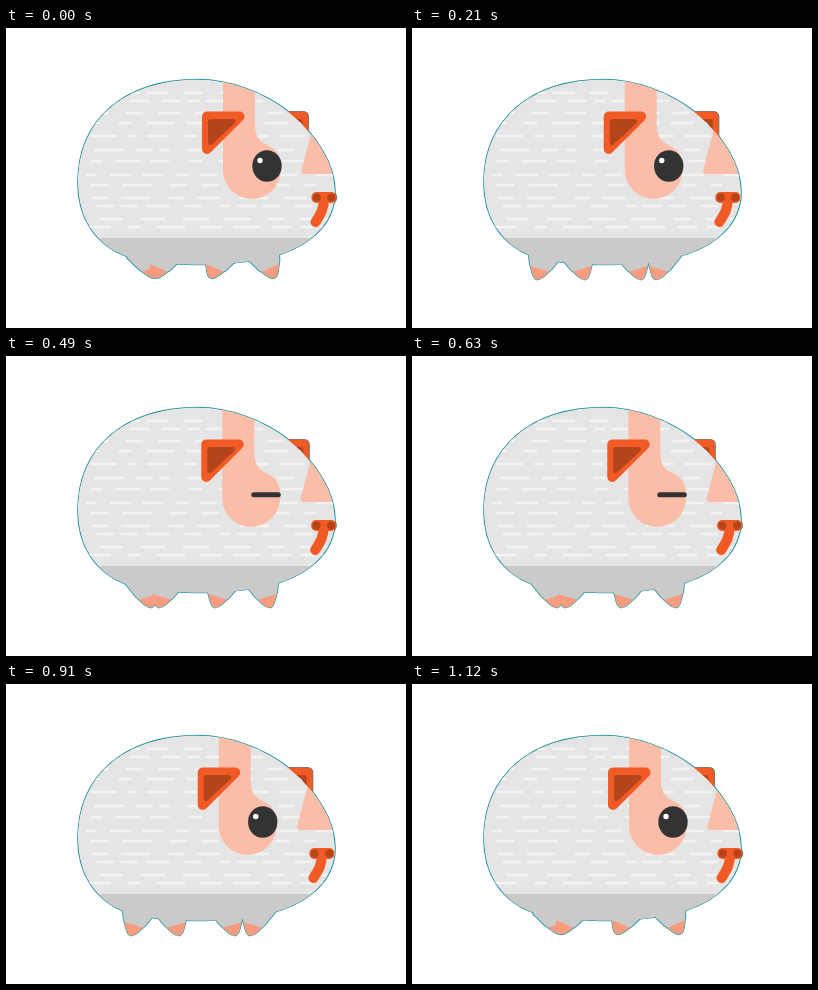
Recreate the animation shown at these times as an HTML page with a canvas. Size 400 by 300 pixels, loop 1190 ms.

```html
<!DOCTYPE html>
<html lang="en">
<head>
<meta charset="utf-8">
<title>Walking guinea pig</title>
<style>
  html, body { margin: 0; width: 100%; height: 100%; overflow: hidden; background: #fff; }
  canvas { display: block; width: 400px; height: 300px; }
</style>
</head>
<body>
<canvas id="stage"></canvas>
<script>
const STEP = 70, STEPS = 17, SWING = 24 * Math.PI / 180;
const COLOR = {
  fur: '#e5e5e5', shade: '#cacaca', streak: '#f3f3f3', skin: '#f9bda8',
  foot: '#f79c7e', orange: '#f15a24', rust: '#b4451b', eye: '#333', edge: '#2596a0'
};

const body = new Path2D(`M72 155 C72 92 118 51.5 192 51.5 C222 51.5 258 64 282 83.5
  C311 107 329 137 329 164 C329 197 302 217 275 226 C255 232 232 236 200 236.5
  C165 236.5 138 234 120 228 C88 216 72 188 72 155Z`);
const leg = new Path2D(`M-12 0 L-18 6 L-11.5 22 L-6 31 Q0 40.8 6 31
  L11.5 22 L18 6 L12 0Z`);
const blaze = new Path2D(`M217 40 V142 A29 29 0 0 0 246 171 A29 30 0 0 0 275 140
  C275 128 270 121 261 117 C252 113 249 107 249 96 V40Z`);
const muzzle = new Path2D('M308 94 L295.5 142 Q294.5 146 299 146 H350 V94Z');
const trunk = new Path2D('M318 170 C318 182 314 187 309.5 194');
const nearEar = new Path2D('M201 88.5 H233.5 L201 121Z');
const nearEarInner = new Path2D('M204.5 93.5 H227 L204.5 114.5Z');
const farEar = new Path2D('M297.5 88.5 H265 L297.5 121Z');
const farEarInner = new Path2D('M294 93.5 H271.5 L294 114.5Z');
const noseBar = new Path2D();
noseBar.roundRect(305.5, 164, 25, 11, 5);

// Hip position and swing direction of each leg
const legs = [[135, -1], [163, 1], [219, 1], [254, -1]];
const streaks = makeStreaks();

const canvas = document.getElementById('stage');
const ratio = window.devicePixelRatio || 1;
canvas.width = 400 * ratio;
canvas.height = 300 * ratio;
const c = canvas.getContext('2d');
c.scale(ratio, ratio);
c.lineCap = c.lineJoin = 'round';

function makeStreaks() {
  let seed = 23;
  const rand = () => (seed = seed * 16807 % 2147483647) / 2147483647;
  const path = new Path2D();
  for (const y of [65, 73, 85, 95, 108, 122, 133, 147, 157, 170, 178, 191, 199]) {
    let x = 74 + rand() * 22;
    while (x < 325) {
      const end = x + 7 + rand() * 21;
      path.moveTo(x, y);
      path.lineTo(end, y);
      x = end + 8 + rand() * 14;
    }
  }
  return path;
}

function fill(path, color) {
  c.fillStyle = color;
  c.fill(path);
}

function line(path, color, width) {
  c.strokeStyle = color;
  c.lineWidth = width;
  c.stroke(path);
}

function solid(path, color, width) {
  fill(path, color);
  line(path, color, width);
}

function oval(x, y, rx, ry, color) {
  const path = new Path2D();
  path.ellipse(x, y, rx, ry, 0, 0, 2 * Math.PI);
  fill(path, color);
}

function at(x, y, angle, paint) {
  c.save();
  c.translate(x, y);
  c.rotate(angle);
  paint();
  c.restore();
}

function eachLeg(angle, paint) {
  for (const [x, side] of legs) at(x, 217, side * angle, paint);
}

function paintLeg() {
  fill(leg, COLOR.shade);
  c.clip(leg);
  c.fillStyle = COLOR.foot;
  c.fillRect(-20, 25, 40, 20);
}

function paintBody(shift) {
  c.save();
  c.clip(body);
  fill(body, COLOR.fur);
  line(streaks, COLOR.streak, 2.4);
  c.fillStyle = COLOR.shade;
  c.fillRect(60, 210, 280, 40);
  at(shift, 0, 0, () => {
    fill(blaze, COLOR.skin);
    fill(muzzle, COLOR.skin);
  });
  c.restore();
}

function paintEye(closed) {
  if (closed) {
    const lid = new Path2D();
    lid.roundRect(246, 136.2, 29.5, 5, 2.5);
    fill(lid, COLOR.eye);
  } else {
    oval(261, 138, 14.7, 15.8, COLOR.eye);
    oval(254, 132.5, 2.7, 2.7, '#fff');
  }
}

function paintNose() {
  line(trunk, COLOR.orange, 10);
  fill(noseBar, COLOR.orange);
  oval(310.8, 169.5, 4, 4, COLOR.rust);
  oval(325.3, 169.5, 4, 4, COLOR.rust);
}

function draw(step) {
  const wave = Math.cos(step * Math.PI / 4);
  const shift = -2.5 * (1 - wave);
  const angle = SWING * wave;
  const closed = step >= 7 && step <= 9;

  c.fillStyle = '#fff';
  c.fillRect(0, 0, 400, 300);

  // Thin rim around the whole silhouette
  at(-shift, 0, 0, () => line(farEar, COLOR.edge, 11.2));
  line(body, COLOR.edge, 1.7);
  eachLeg(angle, () => line(leg, COLOR.edge, 1.7));
  at(shift / 2, 0, 0, () => line(noseBar, COLOR.edge, 1.4));

  at(-shift, 0, 0, () => {
    solid(farEar, COLOR.orange, 10);
    solid(farEarInner, COLOR.rust, 5);
  });
  eachLeg(angle, paintLeg);
  paintBody(shift);
  at(shift, 0, 0, () => {
    solid(nearEar, COLOR.orange, 10);
    solid(nearEarInner, COLOR.rust, 5);
    paintEye(closed);
  });
  at(shift / 2, 0, 0, paintNose);
}

const start = performance.now();
function tick() {
  const time = Math.max(0, performance.now() - start);
  draw(Math.floor(time / STEP) % STEPS);
  requestAnimationFrame(tick);
}
tick();
</script>
</body>
</html>
```
